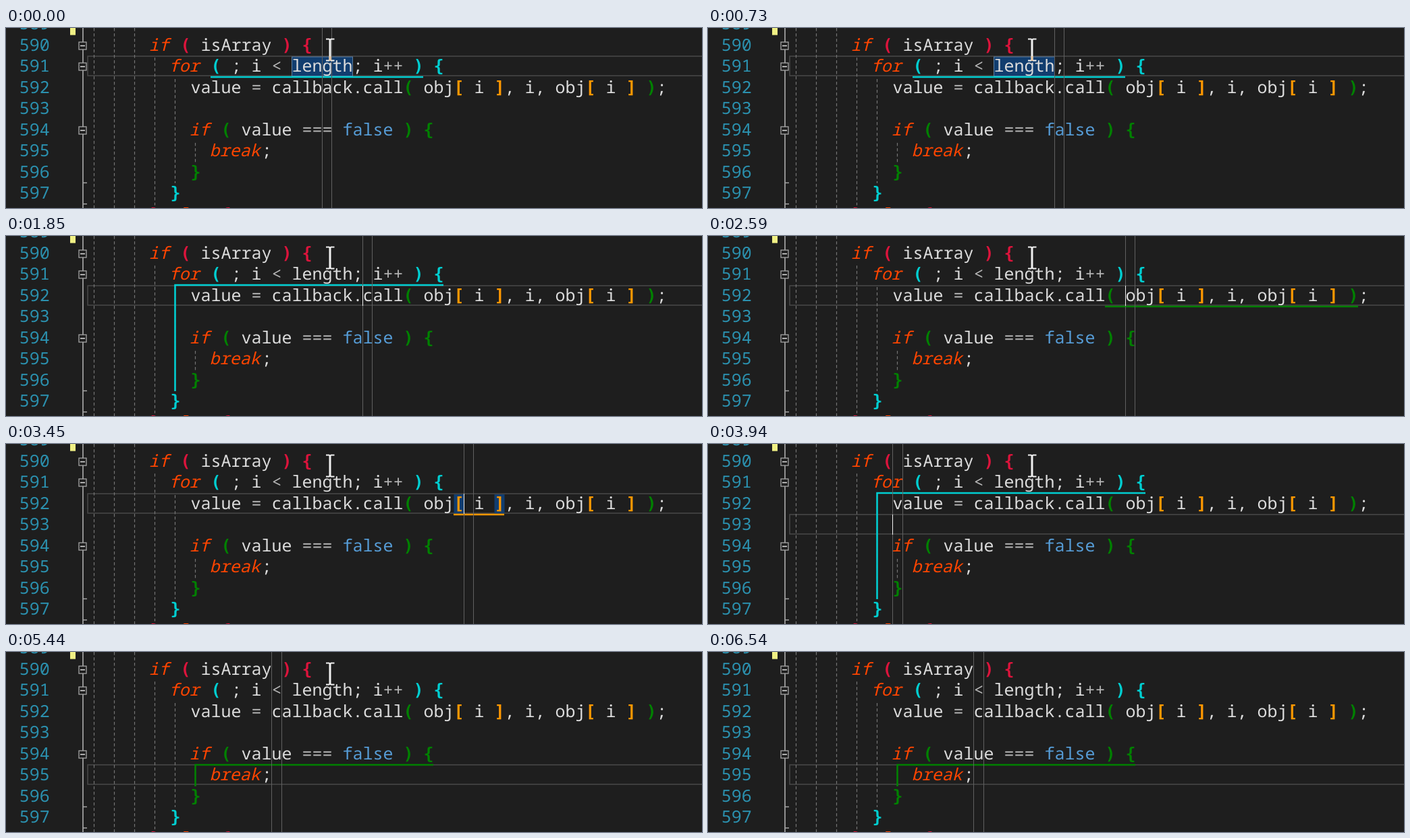
Write an HTML page that moves like this. It is 1031 px wide and 268 px high and loops after 8190 ms.

```html
<!DOCTYPE html>
<html lang="en">
<head>
<meta charset="utf-8">
<title>Code editor</title>
<style>
html, body { margin: 0; width: 100%; height: 100%; overflow: hidden; background: #1e1e1e; }
svg { display: block; }
text { font: 25px "Noto Sans Mono", "DejaVu Sans Mono", monospace; fill: #dcdcdc; text-rendering: geometricPrecision; }
.num { fill: #2b91af; }
.key { fill: #ff4500; font-style: italic; transform: translateX(-2px); }
.lit { fill: #569cd6; }
.op { fill: #b4b4b4; }
.bracket { font-family: "DejaVu Sans Mono", monospace; font-weight: 700; }
</style>
</head>
<body>
<svg id="stage" width="1031" height="268" viewBox="0 0 1031 268"></svg>
<script>
const LOOP = 8190, CELL = 15, LEFT = 213, FIRST = 589;
const DEPTH = ['#dc143c', '#00ced1', '#008000', '#ff9800'];
const colX = c => LEFT + c * CELL;
const rowY = r => Math.round(42 + (r - 591) * 31.5);
const stage = document.getElementById('stage');

function add(tag, attrs, parent = stage) {
  const el = document.createElementNS('http://www.w3.org/2000/svg', tag);
  for (const k in attrs) el.setAttribute(k, attrs[k]);
  parent.appendChild(el);
  return el;
}
const group = () => add('g', {});
const rect = (x, y, width, height, fill, parent) => add('rect', { x, y, width, height, fill }, parent);
const line = (d, stroke, width, parent) => add('path', { d, stroke, 'stroke-width': width, fill: 'none' }, parent);
function word(s, x, row, cls, fill) {
  const el = add('text', { x, y: rowY(row) + 23, class: cls });
  el.textContent = s;
  if (fill) el.style.fill = fill;
}

// Current row frame and word highlights sit under the text
const frame = add('rect', { x: 121, width: 930, height: 29, fill: 'none', stroke: '#464646', 'stroke-width': 1.6 });

function highlight(row, spans, border) {
  const g = group();
  for (const [from, to] of spans) {
    const box = rect(colX(from) + 0.5, rowY(row) + 1, (to - from) * CELL, 28.5, '#113d6f', g);
    if (border) box.setAttribute('stroke', '#5f7f9f');
  }
  return g;
}
const marks = {
  length: highlight(591, [[14, 20]], true),
  callback: highlight(592, [[12, 20]], true),
  obj: highlight(592, [[27, 30], [40, 43]], true),
  index: highlight(592, [[30, 31], [34, 35]], false)
};

// Margin
rect(95, 0, 8, 10.5, '#f0f084');
line('M114 0V268M114 230.5h6M114 262h6', '#a5a5a5', 1.7);
for (const row of [590, 591, 594]) {
  const y = rowY(row) + 10;
  add('rect', { x: 108, y, width: 11, height: 11, fill: '#1e1e1e', stroke: '#a5a5a5', 'stroke-width': 1.3 });
  line(`M110 ${y + 5.5}h7`, '#e0e0e0', 1.5);
}

// Indent guides: column, top, bottom
for (const [c, top, bottom] of [[-6, 0, 268], [-4, 0, 268], [-2, 0, 268], [0, 44, 264], [2, 76, 231], [4, 171, 200]]) {
  line(`M${colX(c) + 7.5} ${top}V${bottom}`, '#747474', 1.2).setAttribute('stroke-dasharray', '4.5 3.5');
}

// Code: indent in columns, then text
const code = [
  [0, ''],
  [0, 'if ( isArray ) {'],
  [2, 'for ( ; i < length; i++ ) {'],
  [4, 'value = callback.call( obj[ i ], i, obj[ i ] );'],
  [0, ''],
  [4, 'if ( value === false ) {'],
  [6, 'break;'],
  [4, '}'],
  [2, '}'],
  [0, '} else {']
];
const token = /\b(?:if|for|break|else)\b|\bfalse\b|[()\[\]{}]|[<=+]+|[^\s()\[\]{}<=+]+/g;
let depth = 0;
code.forEach(([indent, src], i) => {
  const row = FIRST + i;
  word(String(row), 19.8, row, 'num');
  for (const m of src.matchAll(token)) {
    const s = m[0], x = colX(indent + m.index) + 0.4;
    if (/[()\[\]{}]/.test(s)) {
      if (/[)\]}]/.test(s)) depth--;
      word(s, x, row, 'bracket', DEPTH[depth]);
      if (/[(\[{]/.test(s)) depth++;
    } else {
      const cls = /^(if|for|break|else)$/.test(s) ? 'key' : s === 'false' ? 'lit' : /^[<=+]/.test(s) ? 'op' : '';
      word(s, x, row, cls);
    }
  }
});

// Scope markers: underlines and block outlines
function underline(row, from, to, color) {
  const g = group();
  line(`M${colX(from)} ${rowY(row) + 31}H${colX(to)}`, color, 2.6, g);
  return g;
}
function block(row, c, to, end, color) {
  const g = group(), x = colX(c) + 7.5;
  line(`M${x} ${rowY(end)}V${rowY(row) + 31}H${colX(to)}`, color, 2.6, g);
  return g;
}
const scopes = {
  head: underline(591, 6, 27, DEPTH[1]),
  loop: block(591, 2, 29, 597, DEPTH[1]),
  call: underline(592, 25, 50, DEPTH[2]),
  index: underline(592, 30, 35, DEPTH[3]),
  test: block(594, 4, 28, 596, DEPTH[2])
};

const guideA = rect(0, 0, 1, 268, '#606060');
const guideB = rect(0, 0, 1, 268, '#606060');
const caret = rect(0, 0, 1, 30, '#f0f0f0');

const mouse = group();
line('M474 16.5h4.5l1.5 1l1.5 -1h5M474 48.5h4.5l1.5 -1l1.5 1h5', '#f0f0f0', 2, mouse);
rect(478.5, 17, 3, 31, '#f0f0f0', mouse);
const tint = rect(478.5, 42, 3, 7, '#eec9a0', mouse);

// time, row, column, caret shown, scope, highlight
const steps = [
  [0, 591, 17, 0, 'head', 'length'],
  [120, 591, 18, 1, 'head', 'length'],
  [240, 591, 19, 1, 'head', 'length'],
  [360, 591, 20, 1, 'head', 'length'],
  [730, 591, 20, 0, 'head', 'length'],
  [1240, 592, 20, 1, 'head', 'length'],
  [1360, 592, 20, 1, 'loop', 'callback'],
  [1730, 592, 21, 1, 'loop', 'callback'],
  [1850, 592, 21, 1, 'loop', ''],
  [2350, 592, 25, 1, 'loop', ''],
  [2470, 592, 27, 1, 'loop', ''],
  [2590, 592, 27, 1, 'call', ''],
  [2840, 592, 28, 1, 'call', 'obj'],
  [3090, 592, 29, 1, 'call', 'obj'],
  [3210, 592, 30, 1, 'call', 'obj'],
  [3330, 592, 31, 1, 'call', ''],
  [3450, 592, 31, 1, 'index', 'index'],
  [3570, 592, 32, 1, 'index', ''],
  [3820, 593, 4, 1, 'index', ''],
  [3940, 593, 4, 1, 'loop', ''],
  [4440, 594, 28, 1, 'test', ''],
  [4940, 595, 12, 1, 'test', ''],
  [5440, 595, 12, 0, 'test', ''],
  [5930, 595, 12, 1, 'test', ''],
  [6540, 595, 12, 0, 'test', '']
];
// time, offset x, offset y, shown
const moves = [[0, 0, 0, 1], [5810, -80, 52, 1], [5930, -160, 104, 1], [6050, -233, 155, 1], [6170, 0, 0, 0]];

const at = (table, t) => table.findLast(s => s[0] <= t);
const show = (el, on) => { el.style.display = on ? '' : 'none'; };
const pick = (set, name) => { for (const k in set) show(set[k], k === name); };

function draw(t) {
  const [, row, col, on, scope, mark] = at(steps, t);
  const y = rowY(row), x = colX(col);
  // A line break is one pixel wider than a character
  const [indent, src] = code[row - FIRST];
  const width = col >= indent + src.length ? CELL : CELL - 1;
  frame.setAttribute('y', y);
  guideA.setAttribute('x', x);
  guideB.setAttribute('x', x + width);
  caret.setAttribute('x', x);
  caret.setAttribute('y', y);
  show(caret, on);
  pick(scopes, scope);
  pick(marks, mark);
  const [, dx, dy, seen] = at(moves, t);
  mouse.setAttribute('transform', `translate(${dx} ${dy})`);
  show(mouse, seen);
  show(tint, mark === 'length');
}

const start = performance.now();
function tick() {
  draw((performance.now() - start) % LOOP);
  requestAnimationFrame(tick);
}
tick();
</script>
</body>
</html>
```
